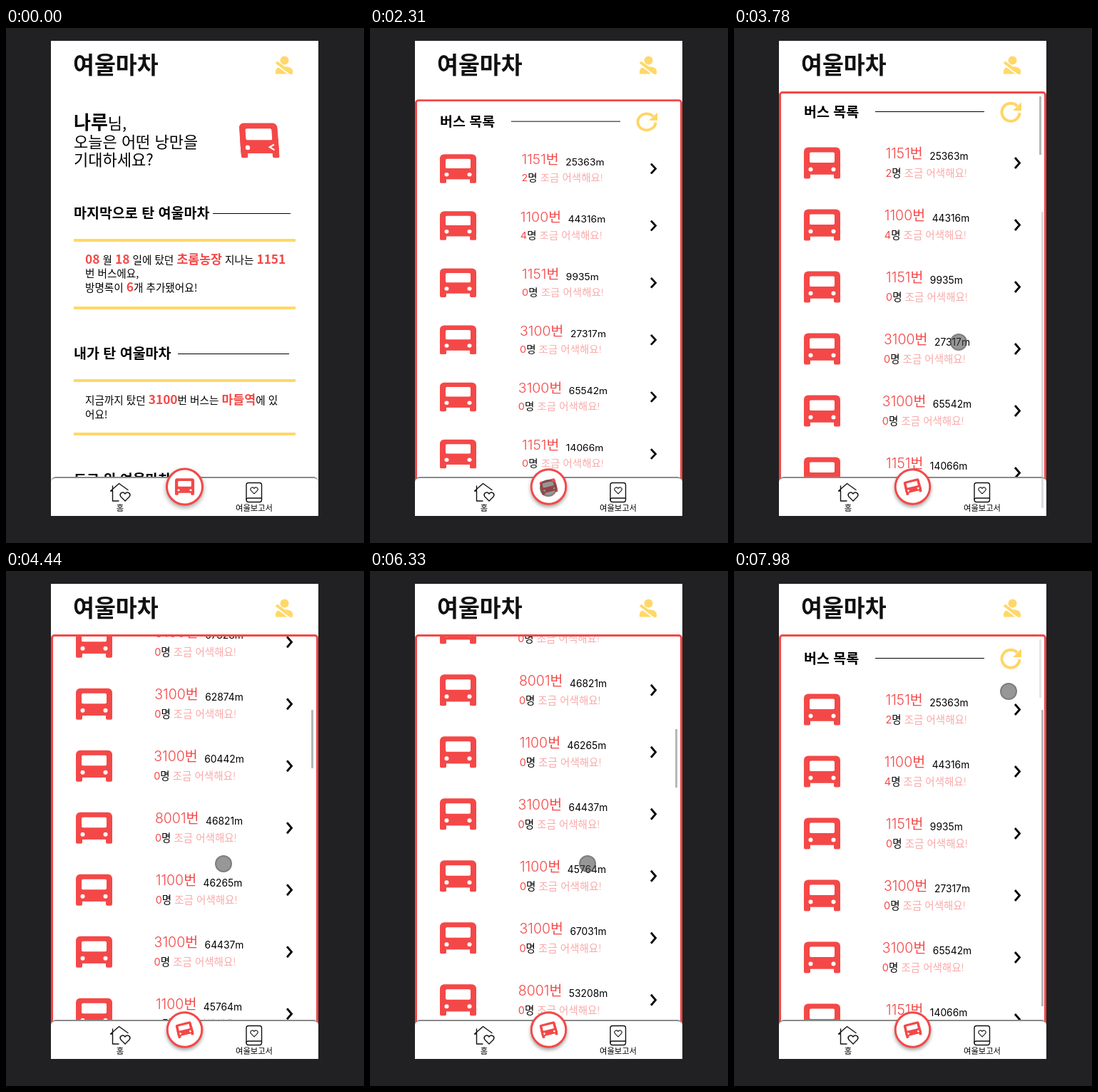
These frames come from a looping animation (502x723 px, 8 s). An HTML page:

```html
<!DOCTYPE html>
<html lang="ko">
<head>
<meta charset="utf-8">
<style>
  html, body { margin: 0; width: 100%; height: 100%; overflow: hidden; background: #212123; }
  body { font-family: "Noto Sans CJK KR", "Noto Sans CJK", sans-serif; }
  svg { position: absolute; left: 0; top: 0; overflow: visible; }
  #stage { position: absolute; left: 0; top: 0; width: 502px; height: 723px; overflow: hidden; }
  #phone { position: absolute; left: 63px; top: 18px; width: 375px; height: 667px; background: #fff; overflow: hidden; }
  #home, #chrome { left: -63px; top: -18px; }
  #panel { position: absolute; left: 0; top: 71px; width: 375px; height: 700px; box-sizing: border-box;
    border: 3px solid #f44848; border-radius: 5px; overflow: hidden; background: #fff; transform-origin: 0 143px; }
  #list { padding-top: 58.5px; }
  .row { position: relative; height: 87px; }
  .info { position: absolute; left: 204.5px; top: 16.5px; transform: translateX(-50%); white-space: nowrap;
    font-family: Inter, "Noto Sans CJK KR", "Noto Sans CJK", sans-serif; font-weight: 300; }
  .bus { font-size: 19.5px; line-height: 28px; color: #f44848; }
  .bus span { position: relative; top: 2px; margin-left: 4px; font-size: 13.8px; font-weight: 400; line-height: 0; color: #000; }
  .mood { margin-top: 4px; font-size: 14.5px; line-height: 20px; color: #faa9a9; }
  .mood b { font-weight: 400; color: #f44848; }
  .mood i { font-style: normal; color: #000; }
  #nav { position: absolute; left: 0; top: 612px; width: 375px; height: 60px; box-sizing: border-box;
    border-top: 2px solid #8a8a8a; border-radius: 7px 7px 0 0; background: #fff; }
  .thumb { position: absolute; width: 3px; background: #b4b8ba; }
  #inner { left: 428px; height: 82px; }
  #outer { left: 431px; height: 416px; }
  #cursor { position: absolute; left: -12px; top: -12px; width: 20px; height: 20px; border-radius: 50%;
    background: rgba(70, 70, 70, .56); border: 2px solid rgba(90, 90, 90, .4); }
  .h { font-size: 19.5px; font-weight: 700; }
  .p { font-size: 14.6px; }
  .p tspan { font-size: 17.3px; font-weight: 700; fill: #f44848; }
  .big { font-size: 22px; font-weight: 300; }
  .tab { font-size: 11.3px; text-anchor: middle; }
  .ink { fill: none; stroke: #111; stroke-width: 1.4; stroke-linejoin: round; stroke-linecap: round; }
</style>
</head>
<body>
<div id="stage">
  <div id="phone">
    <svg id="home" width="502" height="723">
      <text class="big" x="95" y="142"><tspan font-size="26" font-weight="700">나루</tspan>님,</text>
      <text class="big" x="95" y="168">오늘은 어떤 낭만을</text>
      <text class="big" x="95" y="193">기대하세요?</text>
      <g transform="matrix(1.05 0 .08 1.11 326.5 133.5)">
        <use href="#busIcon"/>
        <g id="wink">
          <circle cx="42" cy="31" r="4" fill="#f44848"/>
          <path d="M45 27L39 30.500L45 34" fill="none" stroke="#fff" stroke-width="2"/>
        </g>
      </g>
      <text class="h" x="95" y="267">마지막으로 탄 여울마차</text>
      <text class="p" x="111" y="331"><tspan>08</tspan> 월 <tspan>18</tspan> 일에 탔던 <tspan>초롬농장</tspan> 지나는 <tspan>1151</tspan></text>
      <text class="p" x="111" y="350">번 버스에요,</text>
      <text class="p" x="111" y="370">방명록이 <tspan>6</tspan>개 추가됐어요!</text>
      <text class="h" x="95" y="464">내가 탄 여울마차</text>
      <text class="p" x="111" y="528">지금까지 탔던 <tspan>3100</tspan>번 버스는 <tspan>마들역</tspan>에 있</text>
      <text class="p" x="111" y="548">어요!</text>
      <text class="h" x="95" y="641">도로 위 여울마차</text>
      <path d="M290 260.500H399M241 457.500H397" stroke="#000"/>
      <path d="M95 298H406M95 393H406M95 495H406M95 570H406" stroke="#ffd869" stroke-width="4"/>
    </svg>

    <div id="panel"><div id="list">
      <svg width="369" height="58">
        <text x="32" y="37.500" font-size="19.500" font-weight="700">버스 목록</text>
        <path d="M132 30.500H285" stroke="#000"/>
        <path d="M331 22.500A12.500 12.500 0 1 0 334.500 32" fill="none" stroke="#ffd566" stroke-width="4"/>
        <path d="M337 17V29H325Z" fill="#ffd566"/>
      </svg>
    </div></div>

    <div id="nav"></div>
    <svg id="chrome" width="502" height="723">
      <defs>
        <g id="busIcon">
          <g fill="#f44848">
            <rect width="51" height="38" rx="6"/>
            <rect y="20" width="51" height="18"/>
            <rect y="30" width="9" height="14" rx="2"/>
            <rect x="42" y="30" width="9" height="14" rx="2"/>
          </g>
          <g fill="#fff">
            <rect x="8" y="7" width="35" height="14.500" rx="2"/>
            <circle cx="9.500" cy="31" r="3"/>
            <circle cx="41.500" cy="31" r="3"/>
          </g>
        </g>
        <path id="heart" d="M0 6.500L-6 .5C-9 -4 -3 -8 0 -3.500C3 -8 9 -4 6 .5Z"/>
      </defs>
      <text x="94" y="64" font-size="32.500" font-weight="900" fill="#111">여울마차</text>
      <g fill="#ffd869">
        <circle cx="390.500" cy="45.500" r="6"/>
        <path d="M378 64.500V60Q379 54 390 54Q401 54 402 60V64.500Z"/>
        <path d="M378 51L398 66" stroke="#fff" stroke-width="2"/>
        <path d="M379 48L401 64" stroke="#ffd869" stroke-width="4"/>
      </g>
      <g class="ink">
        <path d="M158 664H149.500V650H146.500L158.500 639.500L171 648.500M149.500 649V643"/>
        <use href="#heart" transform="translate(167 657.500)"/>
        <rect x="337" y="638.500" width="21.500" height="27" rx="3"/>
        <path d="M337 662Q337 660 340 660H358.500"/>
        <use href="#heart" transform="translate(348 649) scale(.75)"/>
      </g>
      <text class="tab" x="160" y="678">홈</text>
      <text class="tab" x="348" y="678">여울보고서</text>
      <g id="button">
        <circle r="25" fill="#fff" stroke="#f44848" stroke-width="3" style="filter: drop-shadow(0 3px 3px rgba(0,0,0,.35))"/>
        <g id="buttonIcon"><use href="#busIcon" transform="scale(.53) translate(-25.500 -22)"/></g>
      </g>
    </svg>
  </div>
  <div class="thumb" id="inner"></div>
  <div class="thumb" id="outer"></div>
  <div id="cursor"></div>
</div>

<script>
const $ = id => document.getElementById(id);

const buses = `1151번 25363m, 1100번 44316m, 1151번 9935m, 3100번 27317m, 3100번 65542m, 1151번 14066m,
  3100번 64437m, 3100번 67328m, 3100번 62874m, 3100번 60442m, 8001번 46821m, 1100번 46265m, 3100번 64437m,
  1100번 45764m, 3100번 67031m, 8001번 53208m, 1100번 45764m, 1151번 9820m, 1151번 9935m`.split(",");

const row = (bus, i) => {
  const [number, distance] = bus.trim().split(" ");
  return `<div class="row">
    <svg width="369" height="87">
      <use href="#busIcon" x="32" y="21.5"/>
      <path d="M328 36L334.500 43.500L328 51" fill="none" stroke="#000" stroke-width="2.800"/>
    </svg>
    <div class="info">
      <div class="bus">${number} <span>${distance}</span></div>
      <div class="mood"><b>${[2, 4][i] || 0}</b><i>명</i> 조금 어색해요!</div>
    </div>
  </div>`;
};
$("list").insertAdjacentHTML("beforeend", buses.map(row).join(""));

function draw(t) {
  // progress from 0 to 1 between two times, easing out
  const ease = (from, to) => 1 - (1 - Math.min(1, Math.max(0, (t - from) / (to - from)))) ** 3;

  // page change
  const leave = ease(1570, 1970), enter = ease(1980, 2560);
  $("home").style.opacity = 1 - leave;
  $("wink").style.opacity = t < 400 ? 1 : 0;
  $("panel").style.transform = `scaleY(${enter})`;
  $("button").setAttribute("transform", `translate(250.5 644) scale(${1 - .03 * leave})`);
  $("buttonIcon").setAttribute("transform", `rotate(${-14 * leave}) scale(${1 - .14 * leave})`);

  // the page scrolls a little, the list in it a lot
  const page = ease(2840, 3640) - .275 * ease(7660, 7980);
  const nudge = 5 * (ease(2840, 3640) - ease(7700, 7980));
  const scroll = 700 * ease(3790, 4530) + 424 * ease(4750, 5400) - 228 * ease(5710, 5980)
    - 336 * ease(6330, 6600) - 560 * ease(6860, 7560);
  $("list").style.transform = `translateY(${-scroll - nudge}px)`;
  $("inner").style.top = 96 + scroll / 7.06 + "px";
  $("inner").style.opacity = t < 3640 ? 0 : 1 - .65 * ease(7660, 7980);
  $("outer").style.top = 29 + 229 * page + "px";
  $("outer").style.opacity = t < 2840 ? 0 : t < 7700 ? 1 - ease(3640, 4320) : 1;

  // pointer: up to the button, onto the list, to the top right
  const rise = ease(30, 900), toList = ease(2840, 3640), settle = ease(3800, 4300), exit = ease(7700, 7980);
  const x = 290 - 40 * rise + 65 * toList - 10 * settle + 80 * exit;
  const y = 740 - 94 * rise - 205 * toList - 30 * settle - 242 * exit;
  $("cursor").style.transform = `translate(${x}px, ${y}px)`;
}

const start = performance.now();
(function frame() {
  draw((performance.now() - start) % 8000);
  requestAnimationFrame(frame);
})();
</script>
</body>
</html>
```
